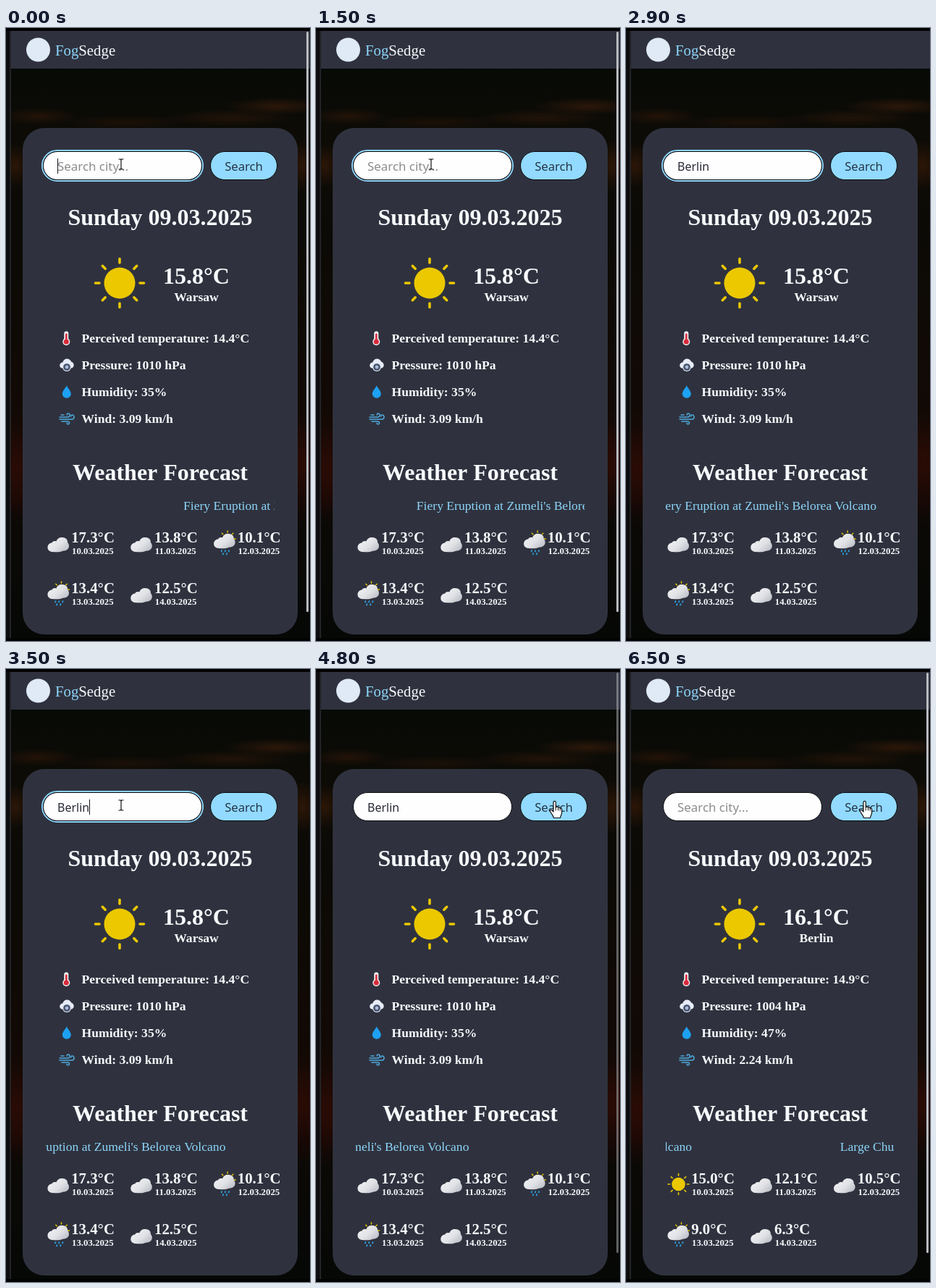
An HTML page with a canvas that plays this animation: 420x846 px, repeating every 6600 ms.

```html
<!DOCTYPE html>
<html lang="en">
<head>
<meta charset="utf-8">
<title>Weather</title>
<style>
  html, body { margin: 0; width: 100%; height: 100%; overflow: hidden; background: #000; }
  canvas { display: block; width: 420px; height: 846px; }
</style>
</head>
<body>
<canvas id="stage"></canvas>
<script>
const W = 420, H = 846, LOOP = 6600, STEP = 100;
const SERIF = '"Liberation Serif", "Times New Roman", serif';
const SANS = '"Noto Sans", "Open Sans", sans-serif';
const PANEL = '#2f323e', SKY = '#8dd5fa', WHITE = '#f8f9fc', SUN = '#ebc800';

const canvas = document.getElementById('stage');
const ctx = canvas.getContext('2d');
const dpr = window.devicePixelRatio || 1;
canvas.width = W * dpr;
canvas.height = H * dpr;
ctx.scale(dpr, dpr);

const KEYS = [1800, 2000, 2100, 2300, 2350, 2400];
const BLUR = 4500, LOADED = 5400;

const CITIES = {
  before: {
    city: 'Warsaw', temp: '15.8', feels: '14.4', pressure: 1010, humidity: 35, wind: '3.09',
    days: [['cloud', '17.3'], ['cloud', '13.8'], ['rain', '10.1'], ['rain', '13.4'], ['cloud', '12.5']]
  },
  after: {
    city: 'Berlin', temp: '16.1', feels: '14.9', pressure: 1004, humidity: 47, wind: '2.24',
    days: [['sun', '15.0'], ['cloud', '12.1'], ['cloud', '10.5'], ['rain', '9.0'], ['cloud', '6.3']]
  }
};

function text(str, x, y, font, color = WHITE, align = 'left') {
  ctx.font = font;
  ctx.fillStyle = color;
  ctx.textAlign = align;
  ctx.fillText(str, x, y);
}
const bold = size => `bold ${size}px ${SERIF}`;
const serif = size => `${size}px ${SERIF}`;
const sans = size => `${size}px ${SANS}`;

function rect(x, y, w, h, color) {
  ctx.fillStyle = color;
  ctx.fillRect(x, y, w, h);
}

function pill(x, y, w, h, r, fill, stroke, line = 1) {
  ctx.beginPath();
  ctx.roundRect(x, y, w, h, r);
  if (fill) { ctx.fillStyle = fill; ctx.fill(); }
  if (stroke) { ctx.strokeStyle = stroke; ctx.lineWidth = line; ctx.stroke(); }
}

function disc(x, y, r, color) {
  ctx.beginPath();
  ctx.arc(x, y, r, 0, Math.PI * 2);
  ctx.fillStyle = color;
  ctx.fill();
}

function shape(d, x, y, fill, stroke, line = 1) {
  ctx.save();
  ctx.translate(x, y);
  const p = new Path2D(d);
  ctx.lineJoin = ctx.lineCap = 'round';
  if (fill) { ctx.fillStyle = fill; ctx.fill(p); }
  if (stroke) { ctx.strokeStyle = stroke; ctx.lineWidth = line; ctx.stroke(p); }
  ctx.restore();
}

function glow(x, y, rx, ry, rgb, alpha) {
  ctx.save();
  ctx.translate(x, y);
  ctx.scale(rx, ry);
  const g = ctx.createRadialGradient(0, 0, 0, 0, 0, 1);
  g.addColorStop(0, `rgba(${rgb},${alpha})`);
  g.addColorStop(1, `rgba(${rgb},0)`);
  ctx.fillStyle = g;
  ctx.fillRect(-1, -1, 2, 2);
  ctx.restore();
}

function backdrop() {
  rect(0, 0, W, H, '#020203');
  rect(0, 4, 5, 838, '#0d0d10');
  rect(5, 4, 2, 838, '#222326');
  ctx.save();
  ctx.beginPath();
  ctx.rect(7, 4, 413, 838);
  ctx.clip();
  const g = ctx.createLinearGradient(0, 56, 0, 842);
  [[0, '#070a06'], [0.12, '#0d0b06'], [0.3, '#0c0a06'], [0.6, '#120905'],
   [0.7, '#200a05'], [0.76, '#170805'], [0.8, '#0b0906'], [1, '#060806']]
    .forEach(([at, c]) => g.addColorStop(at, c));
  ctx.fillStyle = g;
  ctx.fillRect(7, 56, 413, 786);
  glow(375, 108, 75, 12, '62,30,11', 0.65);
  glow(310, 124, 90, 12, '48,25,10', 0.6);
  glow(45, 122, 55, 12, '52,25,9', 0.6);
  glow(165, 130, 90, 10, '38,20,9', 0.6);
  glow(12, 190, 24, 30, '66,30,8', 0.6);
  glow(410, 190, 24, 36, '66,30,8', 0.6);
  glow(14, 610, 28, 60, '54,12,5', 0.5);
  glow(410, 595, 24, 55, '54,12,5', 0.5);
  rect(7, 4, 413, 52, PANEL);
  ctx.restore();
}

function sun(x, y, r, inner, outer, line) {
  disc(x, y, r, SUN);
  ctx.strokeStyle = SUN;
  ctx.lineWidth = line;
  ctx.lineCap = 'round';
  ctx.beginPath();
  for (let i = 0; i < 8; i++) {
    const c = Math.cos(i * Math.PI / 4), s = Math.sin(i * Math.PI / 4);
    ctx.moveTo(x + c * inner, y + s * inner);
    ctx.lineTo(x + c * outer, y + s * outer);
  }
  ctx.stroke();
}

const CLOUD = 'M7 20C3 20 0 17.5 0 14C0 10 3 7.5 6 7.5C7 5 10 4.5 12 5.5C13 2 16 0 20 0C25 0 28 3 27.6 7C29 8.5 29.5 10 29.5 12C29.5 16 26 18.5 22 18.5C17 20.5 12 20.5 7 20Z';

function cloud(x, y) {
  const g = ctx.createLinearGradient(4, 0, 22, 20);
  g.addColorStop(0, '#f3f3f5');
  g.addColorStop(0.6, '#e1e2e6');
  g.addColorStop(1, '#c3c5cd');
  shape(CLOUD, x, y, g);
}

// x, y: left edge of the column and baseline of the temperature
function dayIcon(kind, x, y) {
  if (kind === 'sun') return sun(x + 15, y + 1, 9.3, 11.8, 14.5, 1.6);
  if (kind === 'cloud') return cloud(x, y - 7);
  sun(x + 19, y - 5, 7, 8.8, 11, 1.4);
  cloud(x, y - 12);
  ctx.strokeStyle = '#2a9ee0';
  ctx.lineWidth = 1.8;
  ctx.beginPath();
  [[11, 11], [16, 11], [21, 11], [13, 15], [18, 15]].forEach(([dx, dy]) => {
    ctx.moveTo(x + dx, y + dy);
    ctx.lineTo(x + dx - 0.4, y + dy + 1.4);
  });
  ctx.stroke();
}

function detailIcons() {
  // thermometer
  pill(80.3, 418.5, 6, 14, 3, '#f3f4f6');
  disc(83.3, 433, 5, '#f3f4f6');
  disc(83.3, 433, 3.6, '#d92b3c');
  pill(82, 421.5, 2.6, 11, 1.3, '#d92b3c');
  // pressure
  shape('M4 13C1 13 0 11 0 9C0 7 2 5 4 5C5 2 7 0 10 0C13 0 15 2 16 4C18 4.5 19.5 6.5 19.5 9C19.5 11 18 13 15 13Z', 74.2, 456.5, '#e6edf8');
  disc(84, 468, 6, '#dce4f1');
  disc(84, 468, 4.8, '#46516b');
  disc(84, 468, 2.4, '#a9bbd6');
  // humidity
  shape('M0 -8.5C2 -4.5 6 -1 6 3A6 5.8 0 0 1 -6 3C-6 -1 -2 -4.5 0 -8.5Z', 83.8, 502, '#1da1f2');
  // wind
  shape('M0 4H11C15 4 15 -1 12 -1C10.5 -1 10 0 10.3 1M2 1H6M0 7H17C21 7 21 1 17.5 1C16 1 15.5 2 15.8 3M3 10H11C14.5 10 14 14 11.5 13.8C10.3 13.7 10 13 10.2 12.2', 74, 533, null, '#4fa9dc', 1.5);
}

function searchBar(t) {
  const focus = t < BLUR;
  if (focus) pill(50, 169, 222, 42, 21, '#10131c', SKY, 2);
  pill(51.5, 170.5, 219, 39, 19.5, '#fefefe', '#07080c');
  pill(282.5, 170.5, 92, 39, 19.5, '#92daff', '#07080c');
  text('Search', 328.5, 196.5, sans(16.6), '#25364a', 'center');

  const typed = t < LOADED ? 'Berlin'.slice(0, KEYS.filter(k => k <= t).length) : '';
  if (typed) text(typed, 71, 196.5, sans(16), '#282b36');
  else text('Search city...', 71, 196.5, sans(16.9), '#8c8c8e');

  const lastKey = KEYS.filter(k => k <= t).pop();
  const phase = lastKey === undefined ? t + 250 : t - lastKey;
  if (focus && phase % 1000 < 500) {
    const w = typed ? ctx.measureText(typed).width : 0;
    rect(71 + Math.round(w), 180, 1, 21, '#15161c');
  }
}

function ticker(t) {
  const x = 245 - 0.0708 * t;
  ctx.save();
  ctx.beginPath();
  ctx.rect(55, 640, 316, 36);
  ctx.clip();
  text("Fiery Eruption at Zumeli's Belorea Volcano", x, 665, serif(17.6), SKY);
  text('Large Chunk', x + 511, 665, serif(17.6), SKY);
  ctx.restore();
}

function weather(d) {
  text('Sunday 09.03.2025', 213, 272, bold(32), WHITE, 'center');
  sun(157, 352, 21.5, 28, 33.5, 3.6);
  text(d.temp + '°C', 263, 353, bold(32), WHITE, 'center');
  text(d.city, 263, 377, bold(17.6), WHITE, 'center');
  detailIcons();
  [`Perceived temperature: ${d.feels}°C`, `Pressure: ${d.pressure} hPa`,
   `Humidity: ${d.humidity}%`, `Wind: ${d.wind} km/h`]
    .forEach((s, i) => text(s, 104.5, 434 + 37 * i, bold(17.6)));
  text('Weather Forecast', 213, 624, bold(32), WHITE, 'center');
  d.days.forEach(([kind, temp], i) => {
    const x = 57.5 + 114.8 * (i % 3), y = 710 + 70 * Math.floor(i / 3);
    dayIcon(kind, x, y);
    text(temp + '°C', x + 32.7, y, bold(20.8));
    text(`${10 + i}.03.2025`, x + 33.5, y + 16, bold(12.8));
  });
}

const PATH = [[3500, 159, 188], [3800, 245, 168], [4100, 327, 158], [4400, 330, 184]];

function pointerAt(t) {
  let [t0, x0, y0] = PATH[0];
  if (t <= t0) return [x0, y0];
  for (const [t1, x1, y1] of PATH.slice(1)) {
    if (t < t1) {
      const k = (t - t0) / (t1 - t0);
      return [x0 + (x1 - x0) * k, y0 + (y1 - y0) * k];
    }
    [t0, x0, y0] = [t1, x1, y1];
  }
  return [x0, y0];
}

function pointer(t) {
  if (t >= KEYS[0] && t < PATH[0][0]) return;
  const [x, y] = pointerAt(t);
  const inside = y > 171 && y < 209;
  if (inside && x > 283) {
    shape('M-2 0C-2 -2.2 1.3 -2.2 1.3 0V7C2 5.8 4.2 6 4.5 7.4C5.2 6.5 7 6.8 7.2 8.2C8.2 7.6 9.6 8.2 9.6 9.8V14C9.6 17 7.8 18.5 7.4 21.5H-1.5C-2 18.5 -5 15.5 -6.6 12.3C-7.2 10.6 -5 9.6 -3.8 11L-2 13Z',
      x, y, '#fff', '#111', 1.2);
    shape('M1.3 7V11M4.5 7.6V11M7.2 8.4V11.3', x, y, null, '#111', 1);
  } else if (inside && x < 270) {
    shape('M-3 -7H-1L0 -6L1 -7H3M0 -6V6M-3 7H-1L0 6L1 7H3', x, y, null, '#111', 1.2);
  } else {
    shape('M0 0V16.5L3.8 13L6.5 19L9 18L6.4 12.2H11.5Z', x, y, '#fff', '#111', 1);
  }
}

const lerp = (t, a, b) => Math.min(1, Math.max(0, (t - a) / (b - a)));

function scrollbar(t) {
  const fade = t < 3500 ? 1 - lerp(t, 1500, 2900) : lerp(t, 4200, 5400);
  if (fade <= 0) return;
  ctx.globalAlpha = fade;
  pill(415, 5, 3, 801, 1.5, '#b9bbc0');
  ctx.globalAlpha = 1;
}

function draw(t) {
  backdrop();
  disc(44.5, 30, 16.5, '#dfeaf6');
  text('Fog', 68, 38, serif(20.8), SKY);
  text('Sedge', 100.3, 38, serif(20.8));
  pill(23, 138, 380, 699, 30, PANEL);
  searchBar(t);
  weather(t < LOADED ? CITIES.before : CITIES.after);
  ticker(t);
  scrollbar(t);
  pointer(t);
}

const start = performance.now();
function tick() {
  const t = (performance.now() - start) % LOOP;
  draw(Math.floor(t / STEP) * STEP);
  requestAnimationFrame(tick);
}
tick();
</script>
</body>
</html>
```
